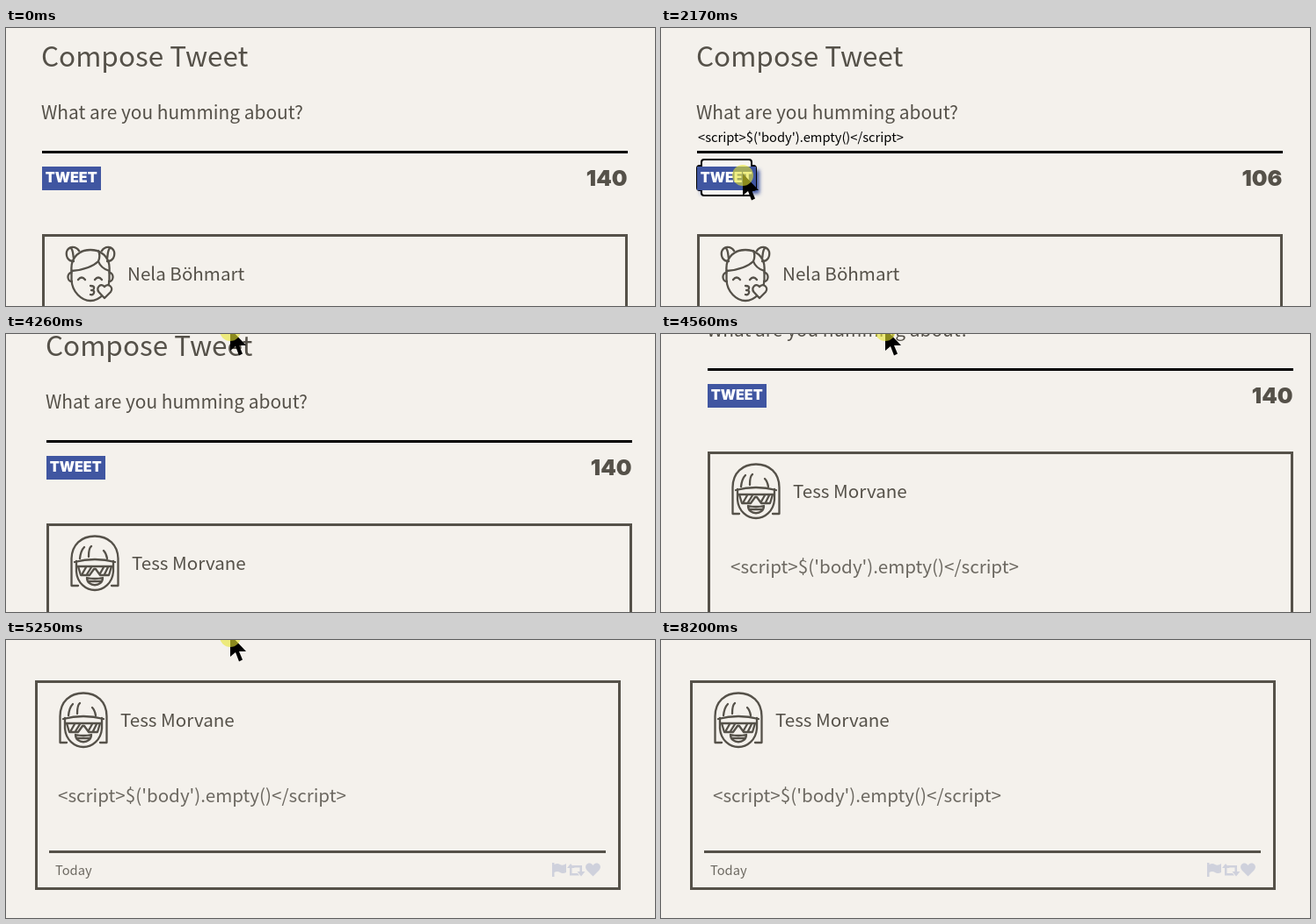
An HTML page that plays this animation: 738 px wide and 317 px high, repeating every 8.98 s.

```html
<!DOCTYPE html>
<html lang="en">
<head>
<meta charset="utf-8">
<title>Compose</title>
<style>
  html, body { margin: 0; width: 100%; height: 100%; overflow: hidden; background: #f4f1ec; }
  svg { display: block; }
  text { font-family: "Noto Sans CJK JP", "Noto Sans CJK SC", "Noto Sans", sans-serif; font-weight: 300; font-size: 20.6px; fill: #555149; white-space: pre; }
  .title { font-size: 31.5px; }
  .small { font-size: 14.7px; }
  .block { font-family: Inter, sans-serif; font-weight: 900; }
  .line { fill: none; stroke: #555149; stroke-width: 2.3; stroke-linecap: round; stroke-linejoin: round; }
  .blue { fill: #4056a1; }
</style>
</head>
<body>
<svg width="738" height="317" viewBox="0 0 738 317">
  <defs>
    <filter id="soft" x="-20%" y="-50%" width="140%" height="200%"><feGaussianBlur stdDeviation="2.3"/></filter>
  </defs>
  <g id="page">
    <text class="title" x="40" y="44">Compose Tweet</text>
    <text x="40" y="103.5" style="font-size:20.9px">What are you humming about?</text>
    <text id="draft" class="small" x="42" y="130" style="fill:#000">&lt;script&gt;$('body').empty()&lt;/script&gt;</text>
    <rect id="caret" y="116" width="1" height="18"/>
    <rect x="41" y="140" width="666" height="3"/>

    <rect id="glow" class="blue" x="45" y="162" width="67" height="27" filter="url(#soft)"/>
    <g id="ring">
      <path d="M49 150H100Q103 150 103 153V157H105Q108 157 108 160V182Q108 185 105 185H103V188Q103 191 100 191H49Q46 191 46 188V185H44Q41 185 41 182V160Q41 157 44 157H46V153Q46 150 49 150Z" fill="#f8f6f3" stroke="#000" stroke-width="2"/>
    </g>
    <rect class="blue" x="41" y="158" width="67" height="27"/>
    <text class="block" x="74.2" y="176" text-anchor="middle" style="font-size:16px;fill:#fff">TWEET</text>
    <text id="count" class="block" x="706.5" y="180" text-anchor="end" style="font-size:25px"></text>

    <rect id="shadow" class="blue" x="51" y="245" width="666" height="239" filter="url(#soft)"/>
    <rect x="42.5" y="236.5" width="663" height="236" fill="#f4f1ec" stroke="#555149" stroke-width="3"/>

    <g id="first">
      <g class="line" transform="translate(68 248)">
        <path d="M6.500 29V39C7 53 18 63 28 63S49 53 49.500 39V29"/>
        <path d="M6.500 29C5 12 17 5 28 5S51 12 49.500 29C43 27 39 24 37 18C30 25 18 28 6.500 29ZM37 18C39 13 38 8 37 6"/>
        <path d="M6.500 31C1 31 1 41 7 41M49.500 31C55 31 55 41 49 41"/>
        <path d="M9 18C2 18 0 12 1 7C3 1 11 0 15 6M47 18C54 18 56 12 55 7C53 1 45 0 41 6M6 3C9 7 8 11 9 15M50 3C47 7 48 11 47 15"/>
        <path d="M14 39Q18 34 22 39M33 39Q37 34 41 39"/>
        <path d="M28 46Q33 46 32 49T29 51Q33 51 32 54T28 56"/>
        <path d="M44 60L37.500 53C34 48 40 42 44 47C48 42 55 48 51 53Z" fill="#f4f1ec"/>
      </g>
      <text x="138" y="288">Nela Böhmart</text>
    </g>
    <g id="second">
      <g class="line" transform="translate(68 248)">
        <path d="M9 58H1.500V28C1.500 11 13 1.500 28 1.500S54.500 11 54.500 28V58H47"/>
        <path d="M7 30V42C8 55 18 63 28 63S48 55 49 42V30M5 31Q28 25 51 31"/>
        <path d="M11 27Q12 18 16 14M21 25Q21 15 24 13M42 27Q41 21 38 18"/>
        <path d="M7 36H49M9 36L12 46H22L27 39H29L34 46H44L47 36M14 44L18 37M19 45L24 37M34 44L38 37M39 45L43 37"/>
        <path d="M19 49Q28 51 37 49C37 60 19 60 19 49ZM20 53H36"/>
      </g>
      <text x="138" y="288">Tess Morvane</text>
    </g>
    <text id="handle" x="684" y="288" text-anchor="end" style="fill:#4056a1">@MrsMorvane47</text>
    <text id="post" x="67" y="374">&lt;script&gt;$('body').empty()&lt;/script&gt;</text>
    <rect x="57" y="429" width="633" height="3" fill="#555149"/>
    <text id="day" class="small" x="64" y="457">Today</text>
    <g id="icons" class="blue">
      <path d="M629 443H631.500V445Q635 443 638 445T645 444V454Q641 456 638 454T631.500 454V459H629Z"/>
      <path d="M650 444L654.500 449H651.500V455H658L660 457.500H649V449H646ZM652 446H663V453H666.500L662 458.500L657.500 453H660.500V448.500H654Z"/>
      <path d="M675.500 458.500L668.500 451.500C664 446 671 440 675.500 446C680 440 687 446 682.500 451.500Z"/>
    </g>
  </g>
  <path id="arrow" d="M0 0V25L6 20L10 30.500L14 28.500L10 19H18Z"/>
  <circle id="press" r="12" fill="#e8e632" fill-opacity=".6"/>
</svg>
<script>
const el = id => document.getElementById(id);
const show = (id, on) => el(id).setAttribute('opacity', +on);
const move = (id, x, y) => el(id).setAttribute('transform', `translate(${x} ${y})`);
const within = (t, a, b) => t >= a && t < b;
const ramp = (t, a, b) => Math.min(1, Math.max(0, (t - a) / (b - a)));

// keys: [time, x, y], joined by straight segments
function along(keys, t) {
  const i = keys.findIndex(k => k[0] > t);
  if (i < 0) return keys[keys.length - 1].slice(1);
  if (i === 0) return keys[0].slice(1);
  const [a, b] = [keys[i - 1], keys[i]], u = ramp(t, a[0], b[0]);
  return [1, 2].map(n => a[n] + (b[n] - a[n]) * u);
}

const pointer = [
  [0, 760, 330], [70, 700, 292], [300, 230, 130], [380, 146, 104], [450, 160, 120],
  [1500, 160, 120], [1800, 120, 140], [2020, 93, 166], [2400, 93, 166], [2560, 93, 168],
  [3280, 93, 168], [3570, 224, 216], [3800, 268, 150], [4180, 255, -6],
  [6430, 255, -6], [6600, 160, 100], [6810, 93, 214], [7060, 93, 214], [7350, -24, 212]
];
const scroll = [
  [4190, 0, 0], [4410, 17, -60], [4560, 12, -101], [4720, 9, -139],
  [4870, 5, -165], [5100, -7, -187], [5250, -8, -189]
];

function draw(now) {
  const t = now % 8980;
  const [x, y] = along(pointer, t);
  const typed = within(t, 1240, 2710);
  const hover = ramp(t, 6560, 6800) * (1 - ramp(t, 7200, 7420));

  move('page', ...along(scroll, t).map(Math.round));
  move('arrow', x, y);
  move('press', x, y + 2);
  show('press', within(t, 700, 860) || within(t, 2170, 2250) || within(t, 4260, 5650));

  show('draft', typed);
  el('count').textContent = typed ? 106 : 140;
  el('caret').setAttribute('x', typed ? 275 : 43);
  show('caret', within(t, 780, 1780));
  show('glow', ramp(t, 1950, 2100) * (1 - ramp(t, 3340, 3500)));
  show('ring', within(t, 2170, 4260));

  show('first', t < 2940);
  show('second', t >= 2940);
  show('shadow', hover);
  show('handle', hover * .5);
  show('icons', .2 + .8 * hover);
  show('post', .85 + .15 * hover);
  show('day', .85 + .15 * hover);
  requestAnimationFrame(draw);
}
requestAnimationFrame(draw);
</script>
</body>
</html>
```
